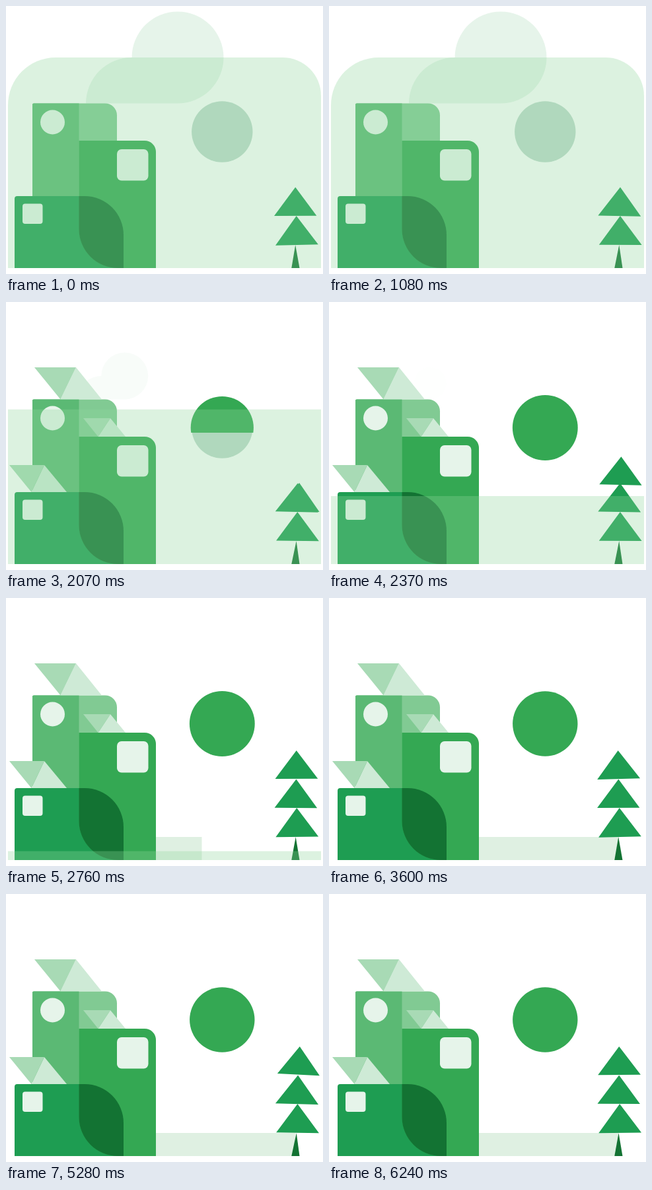
Write an HTML page with a canvas that moves like this. It is 480x406 px and loops after 6.27 s.

```html
<!DOCTYPE html>
<html lang="en">
<head>
<meta charset="utf-8">
<title>Green town</title>
<style>
  html, body { margin: 0; width: 100%; height: 100%; overflow: hidden; background: #fff; }
  canvas { display: block; width: 480px; height: 406px; }
</style>
</head>
<body>
<canvas id="stage"></canvas>
<script>
const W = 480, H = 406, LOOP = 6270, BASE = 397;
const canvas = document.getElementById('stage');
const ctx = canvas.getContext('2d');
const dpr = window.devicePixelRatio || 1;
canvas.width = Math.round(W * dpr);
canvas.height = Math.round(H * dpr);

const ramp = (t, start, length) => Math.min(1, Math.max(0, (t - start) / length));
const inOut = p => p < 0.5 ? 4 * p ** 3 : 1 - 4 * (1 - p) ** 3;
const ease = (t, start, length) => inOut(ramp(t, start, length));

function fill(color, path) {
  ctx.fillStyle = color;
  ctx.fill(path);
}

function poly(...points) {
  const path = new Path2D();
  points.forEach(([x, y]) => path.lineTo(x, y));
  path.closePath();
  return path;
}

function disc(x, y, r) {
  const path = new Path2D();
  path.arc(x, y, r, 0, Math.PI * 2);
  return path;
}

// radii: top left, top right, bottom right, bottom left
function box(x1, y1, x2, y2, radii = 0) {
  const path = new Path2D();
  path.roundRect(x1, y1, x2 - x1, y2 - y1, radii);
  return path;
}

// Shows only the part of a drawing above the line y
function wipe(y, draw) {
  ctx.save();
  ctx.clip(box(0, 0, W, Math.max(0, y)));
  draw();
  ctx.restore();
}

const hill = box(3, 78, 477, BASE, [72, 58, 0, 0]);
const tower = box(40, 147.5, 168, BASE, [2, 18, 0, 0]);
const towerSide = box(40, 147.5, 110.5, BASE, [2, 0, 0, 0]);
const house = box(13, 288, 178, BASE, [4, 59, 0, 0]);
const block = box(110.5, 204, 227, BASE, [0, 17, 0, 59]);

function cloud(t) {
  const s = 1 - 0.00054 * Math.max(0, t - 1165);
  const alpha = 1 - ramp(t, 1124, 1316);
  if (alpha <= 0) return;
  ctx.save();
  ctx.globalAlpha = alpha;
  ctx.translate(96, 147.5);
  ctx.scale(s, s);
  const path = new Path2D();
  path.moveTo(25, 0);
  path.arc(94.5, 0, 69.5, Math.PI, Math.PI * 1.5);
  path.arc(164, -69.5, 69.5, Math.PI, Math.PI * 2.5);
  path.closePath();
  fill('#e6f4ea', path);
  ctx.restore();
}

function sun(t) {
  fill('#bfd9cc', disc(327.3, 190.5, 46.2));
  const r = 46 + 3.6 * ramp(t, 1808, 592) - 0.4 * ramp(t, 2500, 600);
  const p = ease(t, 1808, 500);
  if (p > 0) {
    wipe(190.5 - 49.5 + 99.5 * p, () => fill('#34a853', disc(327.3, 190.5, r)));
  }
}

function roof(t, start, left, ridge, valley, right, top, bottom) {
  const p = ease(t, start, 500);
  if (p <= 0) return;
  wipe(top + (bottom - top) * p, () => {
    fill('#ceead6', poly([ridge, top], [right, bottom], [valley, bottom]));
    fill('#a8dab5', poly([left, top], [ridge, top], [valley, bottom]));
  });
}

function town(t) {
  fill('#81ca93', tower);
  fill('#5bb974', towerSide);
  fill('#e6f4ea', disc(70.5, 176, 18.5));
  roof(t, 1323, 43, 106, 82.5, 145, 99, 147.5);
  roof(t, 1428, 117, 158, 139.5, 181, 176, 204);

  fill('#1e9d52', house);
  fill('#34a853', block);
  ctx.save();
  ctx.clip(house);
  fill('#137333', block);
  ctx.restore();

  roof(t, 1130, 5, 58, 38.5, 92, 247, 288);
  fill('#e6f4ea', box(168, 217, 215.5, 264.5, 7));
  fill('#e6f4ea', box(25, 299.5, 55.5, 330, 4));
}

function tree(t) {
  const w = -Math.cos(t / 3400 * Math.PI * 2);
  const green = '#1e9d52';
  fill('#137333', poly([439 + 0.8 * w, 362], [444.5, BASE], [432.3, BASE]));

  const rise = ease(t, 2070, 410);
  if (rise > 0) {
    const y = 43 * (1 - rise);
    fill(green, poly([441.2 + 3.8 * w, 231 + y],
      [473 + 2 * w, 274.2 + w + y], [408.5 + 2.5 * w, 273.5 - 1.5 * w + y]));
  }
  fill(green, poly([440.2 + 2 * w, 274.5],
    [471.7 + 1.4 * w, 318.4 + 0.6 * w], [407 + w, 317.6 - 0.5 * w]));
  fill(green, poly([440.6 + 0.9 * w, 318],
    [473.4 + 0.6 * w, 361.8 + 0.6 * w], [408.6 + 0.6 * w, 362 - 0.7 * w]));
}

function draw(t) {
  ctx.setTransform(dpr, 0, 0, dpr, 0, 0);
  ctx.fillStyle = '#fff';
  ctx.fillRect(0, 0, W, H);

  cloud(t);
  sun(t);
  const reach = ease(t, 2450, 700);
  if (reach > 0) fill('#dff0e2', box(220, 362, 220 + 218 * reach, BASE));
  town(t);
  tree(t);

  // Pale veil that drains away downwards
  const top = 78 + 319 * ease(t, 1326, 1840);
  if (top < BASE) {
    ctx.save();
    ctx.clip(box(0, top, W, H));
    fill('rgba(142, 213, 155, 0.31)', hill);
    ctx.restore();
  }
}

const begin = performance.now();
function tick() {
  draw((performance.now() - begin) % LOOP);
  requestAnimationFrame(tick);
}
tick();
</script>
</body>
</html>
```
